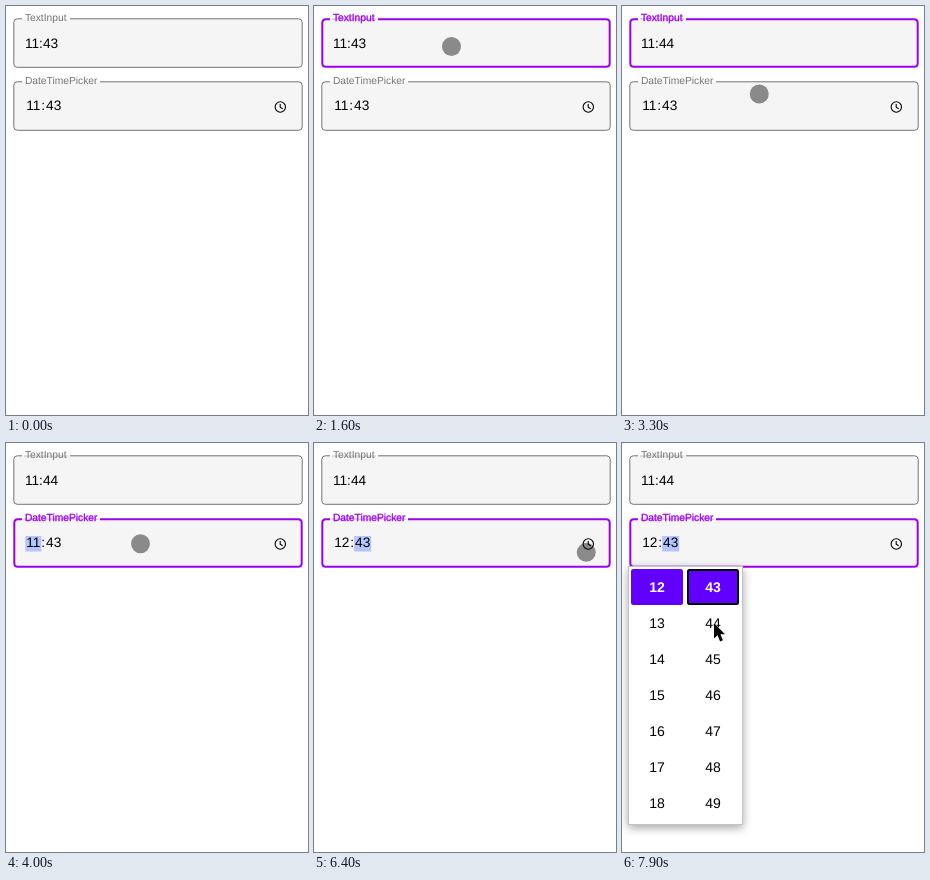
An HTML page that plays this animation: 302 px wide and 409 px high, repeating every 8000 ms.

```html
<!DOCTYPE html>
<html lang="en">
<head>
<meta charset="utf-8">
<title>Time fields</title>
<style>
html, body { margin: 0; width: 100%; height: 100%; overflow: hidden; background: #fff; }
svg { display: block; width: 302px; height: 409px; font: 13.7px "Liberation Sans", Arial, sans-serif; text-rendering: geometricPrecision; }
.field { --tone: #747474; }
.field.focus { --tone: #9c00f0; }
.outline { fill: #f5f5f5; stroke: var(--tone); }
.label { font-size: 10.25px; fill: var(--tone); }
.focus .label { stroke: var(--tone); stroke-width: .3; }
.strike { stroke: var(--tone); stroke-width: .8; opacity: .5; }
.mark { fill: #b5c4fb; }
.panel { fill: #fff; stroke: #c4c4c4; filter: drop-shadow(0 3px 5px rgba(0, 0, 0, .35)); }
.cell { font-size: 14px; text-anchor: middle; }
.cell.on { font-weight: bold; fill: #fff; }
</style>
</head>
<body>
<svg id="stage" viewBox="0 0 302 409"></svg>
<script>
const LOOP = 8000, FRAME = 100;
const stage = document.getElementById("stage");

function add(parent, tag, attrs = {}, text = "") {
  const el = document.createElementNS("http://www.w3.org/2000/svg", tag);
  for (const name in attrs) el.setAttribute(name, attrs[name]);
  el.textContent = text;
  parent.append(el);
  return el;
}
const set = (el, attrs) => { for (const name in attrs) el.setAttribute(name, attrs[name]); };
const show = (el, on) => set(el, { visibility: on ? "visible" : "hidden" });

// Outlined box whose top edge is open behind the label.
function outline(top, gapEnd, width) {
  const h = width / 2, l = 7.3 + h, r = 296.7 - h, t = top + 0.3 + h, b = top + 49.8 - h, c = 3.5;
  return `M${gapEnd} ${t}H${r - c}q${c} 0 ${c} ${c}V${b - c}q0 ${c} ${-c} ${c}` +
    `H${l + c}q${-c} 0 ${-c} ${-c}V${t + c}q0 ${-c} ${c} ${-c}H16`;
}

function makeField(top, gapEnd, name) {
  const group = add(stage, "g", { class: "field" });
  const box = add(group, "path", { class: "outline" });
  add(group, "text", { class: "label", x: 18.9, y: top + 3.2 }, name);
  const strike = add(group, "path", { class: "strike", d: `M18 ${top + 1}H${gapEnd - 2}` });
  return (focused, touched) => {
    group.classList.toggle("focus", focused);
    const width = focused ? 2 : 1;
    set(box, { d: outline(top, gapEnd, width), "stroke-width": width });
    show(strike, touched);
  };
}

const drawTextField = makeField(12, 64, "TextInput");
const drawTimeField = makeField(75, 94, "DateTimePicker");

const TYPED_X = 18.9;
const typed = add(stage, "text", { x: TYPED_X, y: 42 });
const caret = add(stage, "rect", { y: 30, width: 1, height: 15 });

const mark = add(stage, "rect", { class: "mark", y: 93, height: 15.5 });
const hour = add(stage, "text", { y: 104.2 });
const colon = add(stage, "text", { y: 104.2 }, ":");
const minute = add(stage, "text", { y: 104.2 }, "43");

const dot = add(stage, "circle", { r: 9.5, "fill-opacity": .435 });
add(stage, "path", {
  d: "M269.1 101a5.2 5.2 0 1 0 10.4 0a5.2 5.2 0 1 0 -10.4 0M274.2 98v3.2l2.5 1.6",
  fill: "none", stroke: "#000", "stroke-width": 1.1
});

const popup = add(stage, "g");
add(popup, "rect", { class: "panel", x: 6.5, y: 123.5, width: 114, height: 258 });
add(popup, "rect", { x: 9, y: 126, width: 52, height: 36, rx: 2.5, fill: "#6200ff" });
add(popup, "rect", { x: 66, y: 127, width: 50, height: 34, rx: 1.5, fill: "#6200ff", stroke: "#000", "stroke-width": 2 });
for (const [x, first] of [[35, 12], [91, 43]]) {
  for (let row = 0; row < 7; row++) {
    add(popup, "text", { class: row ? "cell" : "cell on", x, y: 149 + 36 * row }, first + row);
  }
}

const arrow = add(stage, "path", {
  d: "M0 0V15.5L3.6 12.2L6.1 18.4L8.9 17.2L6.4 11.2H11Z",
  stroke: "#fff", "stroke-width": 1, "paint-order": "stroke"
});

const easeOut = k => 1 - (1 - k) ** 2;
const smooth = k => k ** 3 * (10 - 15 * k + 6 * k * k);

// start, end, target x, target y, easing, sideways bow
const moves = [
  [100, 600, 137.5, 40.5, easeOut, 0],
  [2900, 3500, 134.5, 100.7, smooth, 3.5],
  [5700, 6500, 274.5, 109.5, smooth, 0],
  [6600, 6800, 274.5, 105.5, smooth, 0],
  [7300, 7900, 92, 180, smooth, 0]
];

function pointerAt(t) {
  let x = 194.5, y = 88.5;
  for (const [start, end, toX, toY, ease, bow] of moves) {
    if (t < start) break;
    const k = Math.min(1, (t - start) / (end - start)), e = ease(k);
    x += (toX - x) * e + bow * Math.sin(Math.PI * e);
    y += (toY - y) * e;
  }
  return [x, y];
}

function drawTyped(t) {
  typed.textContent = t < 2400 ? "11:43" : t < 2500 ? "11:4" : "11:44";
  set(caret, { x: TYPED_X + typed.getComputedTextLength() - 0.2 });
  const since = t - (t < 2400 ? 1100 : 2500);
  show(caret, t >= 1100 && t < 4000 && Math.floor(since / 500) % 2 === 0);
}

function drawTime(t) {
  const left = 19.3, pad = 0.9;
  hour.textContent = t < 5000 ? "11" : t < 5400 ? "01" : "12";
  const hourWidth = hour.getComputedTextLength() + 2 * pad;
  const colonX = left + hourWidth;
  const minuteX = colonX + colon.getComputedTextLength();
  set(hour, { x: left + pad });
  set(colon, { x: colonX });
  set(minute, { x: minuteX + pad });
  const onHour = t < 5400;
  set(mark, {
    x: onHour ? left : minuteX,
    width: onHour ? hourWidth : minute.getComputedTextLength() + 2 * pad
  });
  show(mark, t >= 4000);
}

function draw(t) {
  drawTextField(t >= 1100 && t < 4000, t >= 1100);
  drawTimeField(t >= 4000, t >= 4000);
  drawTyped(t);
  drawTime(t);
  show(popup, t >= 7000);

  const [x, y] = pointerAt(t);
  const offField = y > 125;
  set(dot, { cx: x, cy: y });
  set(arrow, { transform: `translate(${x} ${y})` });
  show(dot, t >= 100 && !offField);
  show(arrow, offField);
}

const origin = performance.now();
function tick() {
  const t = (performance.now() - origin) % LOOP;
  draw(Math.floor(t / FRAME) * FRAME);
  requestAnimationFrame(tick);
}
tick();
</script>
</body>
</html>
```
